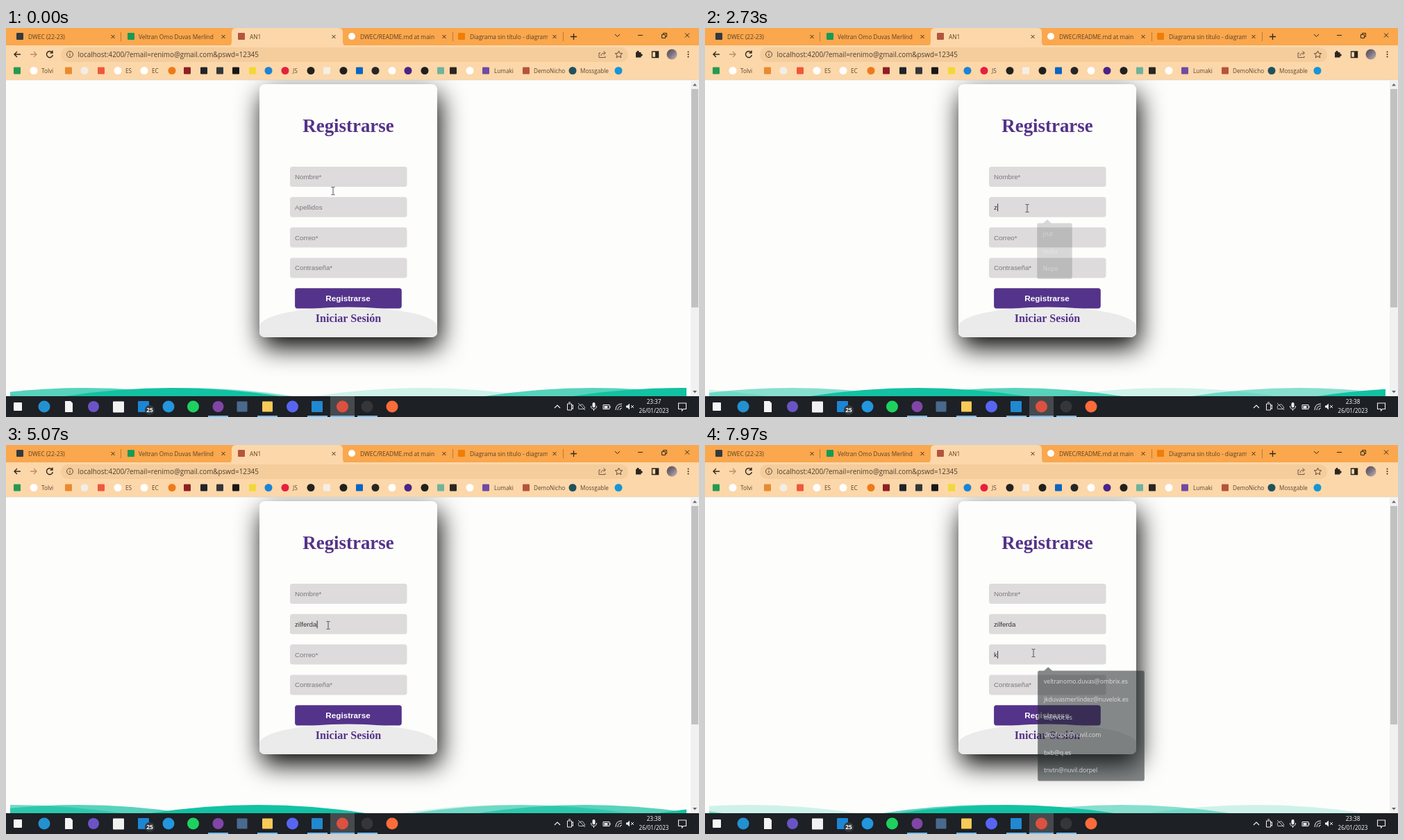
An HTML page with a canvas for the animation above (8 s loop, 998 px wide and 561 px high).

```html
<!DOCTYPE html>
<html lang="es">
<head>
<meta charset="utf-8">
<title>Registrarse</title>
<style>
html, body { margin: 0; width: 100%; height: 100%; overflow: hidden; background: #fdfdfc; }
canvas { display: block; }
</style>
</head>
<body>
<canvas id="stage" width="998" height="561"></canvas>
<script>
const W = 998, H = 561, LOOP = 8000;
const UI = '"Open Sans", "Noto Sans", sans-serif';
const ARIAL = '"Liberation Sans", Arial, sans-serif';
const TIMES = '"Liberation Serif", "Times New Roman", serif';
const PURPLE = '#54338a';
const screen = document.getElementById('stage').getContext('2d');
let g = screen;

function text(str, x, y, font, color, align = 'left') {
  g.font = font;
  g.fillStyle = color;
  g.textAlign = align;
  g.fillText(str, x, y);
}
function rect(x, y, w, h, color) {
  g.fillStyle = color;
  g.fillRect(x, y, w, h);
}
function round(x, y, w, h, r, color) {
  g.fillStyle = color;
  g.beginPath();
  g.roundRect(x, y, w, h, r);
  g.fill();
}
function dot(x, y, r, color) {
  g.fillStyle = color;
  g.beginPath();
  g.arc(x, y, r, 0, Math.PI * 2);
  g.fill();
}
function square(x, y, r, color) {
  round(x - r, y - r, r * 2, r * 2, 1, color);
}
function line(color, width, d) {
  g.strokeStyle = color;
  g.lineWidth = width;
  g.stroke(new Path2D(d));
}
function clipped(x, y, w, h, draw) {
  g.save();
  g.beginPath();
  g.rect(x, y, w, h);
  g.clip();
  draw();
  g.restore();
}

function drawTabs() {
  rect(0, 0, W, 26, '#faa74d');
  g.fillStyle = '#fcd7a9';
  g.fill(new Path2D('M319 26Q325 26 325 20V6Q325 0 331 0H479Q485 0 485 6V20Q485 26 491 26Z'));
  const tabs = [
    [20, 32, 'DWEC (22-23)', square, '#343a40'],
    [180, 191, 'Veltran Omo Duvas Merlínd', square, '#169b55'],
    [339, 351, 'AN1', square, '#b4543d'],
    [498, 510, 'DWEC/README.md at main', dot, '#ffffff'],
    [656, 668, 'Diagrama sin título - diagram', square, '#ef7d09']
  ];
  tabs.forEach(([ix, x, label, shape, color], i) => {
    shape(ix, 12, 5, color);
    clipped(x, 0, 112, 25, () => text(label, x, 15.5, '8.4px ' + UI, '#5a4025'));
    const c = 154 + i * 159;
    line('#3b2c1c', 1, `M${c - 2.5} 10l5 5m0 -5l-5 5`);
  });
  line('#b97a36', 1, 'M165.5 6v13M643.5 6v13M802.5 6v13');
  line('#33281c', 1.3, 'M813 12.5h9M817.5 8v9');
  line('#33281c', 1, 'M877 9l3.5 3.5l3.5 -3.5M910 10.5h7M978 7.5l6 6m0 -6l-6 6');
  line('#33281c', 1, 'M944.5 9.5h5v5h-5zM946.5 9v-1.5h5v5h-1.5');
}

function drawToolbar() {
  rect(0, 25, W, 50, '#fcd7a9');
  round(79, 28, 817, 21, 10.5, '#f5cc9b');
  line('#33281c', 1.4, 'M21 38h-9m4 -4l-4 4l4 4');
  line('#b89065', 1.3, 'M35 38h9m-4 -4l4 4l-4 4');
  line('#33281c', 1.4, 'M66.4 35a4.5 4.5 0 1 0 1 4M67 32.5v3.5h-3.5');
  line('#5c4a37', 1, 'M96.5 38a4.5 4.5 0 1 0 -9 0a4.5 4.5 0 1 0 9 0M92 37v3.5M92 35v1');
  text('localhost:4200/?email=renimo@gmail.com&pswd=12345', 103.5, 41.5, '9.9px ' + UI, '#4c4033');
  line('#6d5a45', 1, 'M856 36h-2v6.5h9v-2M857 40q0 -4 6 -4m-2.5 -2.5l3 2.5l-3 2.5');
  line('#5c4a37', 1, 'M882.5 33l1.5 3.4l3.7 .4l-2.8 2.4l.9 3.6l-3.3 -1.9l-3.3 1.9l.9 -3.6l-2.8 -2.4l3.7 -.4z');
  rect(907, 35, 7.5, 7.5, '#2c2620');
  dot(910, 34.5, 1.7, '#2c2620');
  dot(915, 39, 1.7, '#2c2620');
  line('#2c2620', 1.4, 'M930.5 34h9v8.5h-9z');
  rect(935, 34, 5, 8.5, '#2c2620');
  const photo = g.createLinearGradient(951, 31, 966, 46);
  photo.addColorStop(0, '#4d4650');
  photo.addColorStop(.5, '#807480');
  photo.addColorStop(1, '#c9bcb5');
  dot(959, 38, 7.5, photo);
  [34.5, 38, 41.5].forEach(y => dot(982.5, y, 1, '#33281c'));
}

function drawBookmarks() {
  const squares = [[16, '#269a52'], [90, '#e98a2f'], [137, '#f0573c'], [261, '#8e2025'], [285, '#20232a'],
    [308, '#33373a'], [331, '#171717'], [355, '#f0d936'], [462, '#f4efe7'], [509, '#0a66c2'],
    [626, '#6fb39d'], [644, '#2a2622'], [691, '#6f4ba3'], [749, '#b4543d']];
  const dots = [[40, '#ffffff'], [113, '#f2ede7'], [161, '#ffffff'], [199, '#ffffff'], [239, '#ee7a1a'],
    [378, '#1c84d4'], [402, '#e5203f'], [439, '#22221f'], [486, '#20201f'], [532, '#262626'],
    [556, '#ffffff'], [579, '#4b2489'], [603, '#20201f'], [668, '#ffffff'], [816, '#20525c'], [882, '#1496d8']];
  squares.forEach(([x, c]) => square(x, 61.5, 5, c));
  dots.forEach(([x, c]) => dot(x, 61.5, 5.5, c));
  [[51, 'Tolvi'], [172, 'ES'], [210, 'EC'], [413, 'JS'], [703, 'Lumaki'], [760, 'DemoNicho'], [827, 'Mossgable']]
    .forEach(([x, s]) => text(s, x, 64.5, '8.2px ' + UI, '#5a4632'));
}

function drawCard() {
  clipped(0, 75, 986, 456, () => {
    g.shadowColor = '#000';
    g.shadowBlur = 36.6;
    g.shadowOffsetX = 3.6;
    g.shadowOffsetY = 14.6;
    round(365, 81, 256, 365, 7.3, '#fdfdfc');
  });
  text('Registrarse', 493, 150, 'bold 26.9px ' + TIMES, PURPLE, 'center');
  [200, 243.8, 287.6, 331.4].forEach(y => round(409, y, 168.5, 29, 3.6, '#dddbdc'));
  round(416.1, 375.2, 153.7, 29.2, 3.6, PURPLE);
  text('Registrarse', 492.5, 393.5, 'bold 11.7px ' + ARIAL, '#fff', 'center');
  g.save();
  g.beginPath();
  g.roundRect(365, 81, 256, 365, 7.3);
  g.clip();
  g.fillStyle = '#ebebeb';
  g.beginPath();
  g.ellipse(493, 430.5, 128, 28, 0, Math.PI, 0);
  g.lineTo(621, 446);
  g.lineTo(365, 446);
  g.fill();
  g.restore();
  text('Iniciar Sesión', 493, 423.5, 'bold 16.1px ' + TIMES, PURPLE, 'center');
}

function drawScrollbar() {
  rect(986, 75, 12, 456, '#f1f1f1');
  rect(987, 88, 10, 315, '#c1c1c1');
  g.fillStyle = '#666';
  g.fill(new Path2D('M989 83.5l3 -3.5l3 3.5zM989 523l3 3.5l3 -3.5z'));
}

function drawTaskbar() {
  rect(0, 531, W, 30, '#1d2025');
  rect(467, 531, 35, 30, '#464a4e');
  square(17, 546, 6, '#f5f5f5');
  dot(55, 546, 8.5, '#2391cf');
  g.fillStyle = '#f4f4f4';
  g.fill(new Path2D('M85 538h8l3 3v13h-11z'));
  dot(126, 546, 8, '#6a54c5');
  square(162, 546.5, 8, '#f1f1f1');
  square(198, 546, 8, '#1d86d3');
  dot(207, 551, 7, '#33383d');
  text('25', 207, 554.2, 'bold 8.5px ' + UI, '#fff', 'center');
  dot(234, 546, 8.5, '#2396dd');
  dot(269.5, 546, 8.5, '#1ed15f');
  dot(305.5, 546, 8, '#8145a8');
  square(340, 546, 7.5, '#496a8d');
  square(376.5, 546, 7.5, '#f6cb57');
  dot(412.5, 546, 8.5, '#5865f2');
  square(448, 546, 8, '#2288cf');
  dot(484.5, 546, 8.5, '#dc5140');
  dot(520, 546, 8.5, '#34363a');
  dot(556, 546, 8.5, '#fb6c3a');
  [[291, 29], [362, 29], [434, 29], [467, 35], [506, 29]].forEach(([x, w]) => rect(x, 559, w, 2, '#76b9ed'));

  const ink = '#f0f0f0';
  line(ink, 1.2, 'M790 548l4 -4l4 4');
  line(ink, 1, 'M808.5 542h6v9h-6zM814.5 545l2 -1.5v6l-2 -1.5M810 540h3');
  line('#bfc1c3', 1, 'M825 549.5h8q2 -3 -1 -4q-1 -4 -5 -2q-4 1 -2 6M824 541l10 10');
  round(844.5, 540, 4, 7.5, 2, ink);
  line(ink, 1, 'M842.5 545q0 4.5 4 4.5t4 -4.5M846.5 549.5v2.5');
  line(ink, 1, 'M860 543.5h9v6h-9zM870 545v3');
  rect(861.5, 545, 5, 3.5, ink);
  line(ink, 1, 'M878 551q0 -9 9 -9M881 551q0 -6 6 -6M884 551q0 -3 3 -3');
  g.fillStyle = ink;
  g.fill(new Path2D('M893 544.5h2l3 -3v9l-3 -3h-2z'));
  line(ink, 1, 'M900 544l4 4m0 -4l-4 4');
  text('26/01/2023', 933, 555.3, '8.1px ' + UI, '#fff', 'center');
  line(ink, 1.1, 'M968.5 541h11v8.5h-4l-2 2.5v-2.5h-5z');
}

function makeBackdrop() {
  const layer = document.createElement('canvas');
  layer.width = W;
  layer.height = H;
  g = layer.getContext('2d');
  rect(0, 0, W, H, '#fdfdfc');
  drawTabs();
  drawToolbar();
  drawBookmarks();
  rect(0, 74.5, W, .8, '#e2d6c8');
  drawCard();
  drawScrollbar();
  drawTaskbar();
  g = screen;
  return layer;
}

// One crest per tile; layers slide both ways, back to front. Speed is in tiles per second.
const TILE = 731;
const waves = [
  { start: 845, speed: -1 / 5, alpha: .7 },
  { start: 600, speed: 1 / 30, alpha: .2 },
  { start: 258, speed: -1 / 15, alpha: .5 },
  { start: 240, speed: 1 / 30, alpha: 1 }
];
function drawWaves(s) {
  const half = 155;
  clipped(6, 519, 974, 12, () => {
    g.fillStyle = '#12c2a2';
    for (const w of waves) {
      g.globalAlpha = w.alpha;
      const shift = (w.start + w.speed * TILE * s) % TILE;
      for (let c = shift - TILE; c < W + half; c += TILE) {
        g.beginPath();
        g.moveTo(c - half, 531);
        g.quadraticCurveTo(c, 507, c + half, 531);
        g.fill();
      }
    }
  });
}

const CLICK_1 = 600, CLICK_2 = 5750, MAIL_KEY = 7885;
const surname = 'zilferda';
const keys = [2580, 3200, 3650, 4150, 4350, 4550, 4750, 4950];
const menus = [
  { from: 620, out: 2575, x: 477, y: 279.5, w: 53, h: 84.5, items: ['jrut', 'nubu', 'Nopo'] },
  { from: 5780, out: MAIL_KEY, x: 477, y: 323.3, w: 158, h: 163.5, items: [
    'veltranomo.duvas@ombrix.es', 'jkduvasmerlindez@nuvelok.es', 'tt@tvbt.es',
    'drtulopo@nuvil.com', 'bxb@q.es', 'tnvtn@nuvil.dorpel'] }
];
const path = [[0, 471, 235], [200, 471, 235], [550, 463, 260], [1800, 464, 260], [5150, 464, 260],
  [5700, 470.5, 302], [7000, 470.5, 302], [7500, 473, 300], [LOOP, 473, 300]];

function drawFields(t) {
  const font = '9.74px ' + ARIAL, hint = '#7b797a', ink = '#333';
  const typed = surname.slice(0, keys.filter(k => k <= t).length);
  const mail = t >= MAIL_KEY ? 'k' : '';
  text('Nombre*', 416, 218, font, hint);
  text(typed || 'Apellidos', 416, 262, font, typed ? ink : hint);
  text(mail || 'Correo*', 416, 305.6, font, mail ? ink : hint);
  text('Contraseña*', 416, 349.4, font, hint);
  if (t < CLICK_1) return;
  const inMail = t >= CLICK_2;
  const last = Math.max(...[CLICK_1, ...keys, CLICK_2, MAIL_KEY].filter(k => k <= t));
  if (Math.floor((t - last) / 500) % 2) return;
  g.font = font;
  const x = 416 + g.measureText(inMail ? mail : typed).width;
  rect(x + .3, inMail ? 297 : 253.3, .9, 11, '#222');
}

function drawMenu(m, t) {
  const p = Math.max(0, (t - m.out) / 190);
  if (t < m.from || p >= 1) return;
  const cx = m.x + m.w / 2, cy = m.y + m.h / 2, k = 1 - .06 * p;
  g.save();
  g.globalAlpha = 1 - p;
  g.translate(cx, cy);
  g.scale(k, k);
  g.translate(-cx, -cy);
  const panel = new Path2D();
  panel.roundRect(m.x, m.y, m.w, m.h, 2.5);
  panel.moveTo(m.x + 9.5, m.y);
  panel.lineTo(m.x + 15.5, m.y - 5.5);
  panel.lineTo(m.x + 21.5, m.y);
  g.fillStyle = '#24282a';
  g.fill(panel);
  // The labels stay readable longer than the panel.
  g.globalAlpha = Math.sqrt(1 - p);
  m.items.forEach((s, i) => text(s, m.x + 9, m.y + 19.5 + i * 26.3, '8.95px ' + UI, '#fff'));
  g.restore();
}

function drawPointer(t) {
  const i = path.findIndex((p, n) => n && t <= p[0]);
  const [t0, x0, y0] = path[i - 1], [t1, x1, y1] = path[i];
  const u = (t - t0) / (t1 - t0), e = u * u * (3 - 2 * u);
  const x = x0 + (x1 - x0) * e, y = y0 + (y1 - y0) * e;
  line('#555', 1, `M${x - 2.5} ${y - 5.5}h2l.5 .5l.5 -.5h2M${x} ${y - 5}v10M${x - 2.5} ${y + 5.5}h2l.5 -.5l.5 .5h2`);
}

const backdrop = makeBackdrop();
const begun = performance.now();

function frame() {
  const t = (performance.now() - begun) % LOOP;
  screen.drawImage(backdrop, 0, 0);
  drawWaves(t / 1000);
  drawFields(t);
  text(t < 600 ? '23:37' : '23:38', 933, 542.3, '8.1px ' + UI, '#fff', 'center');
  menus.forEach(m => drawMenu(m, t));
  drawPointer(t);
  requestAnimationFrame(frame);
}
frame();
</script>
</body>
</html>
```
